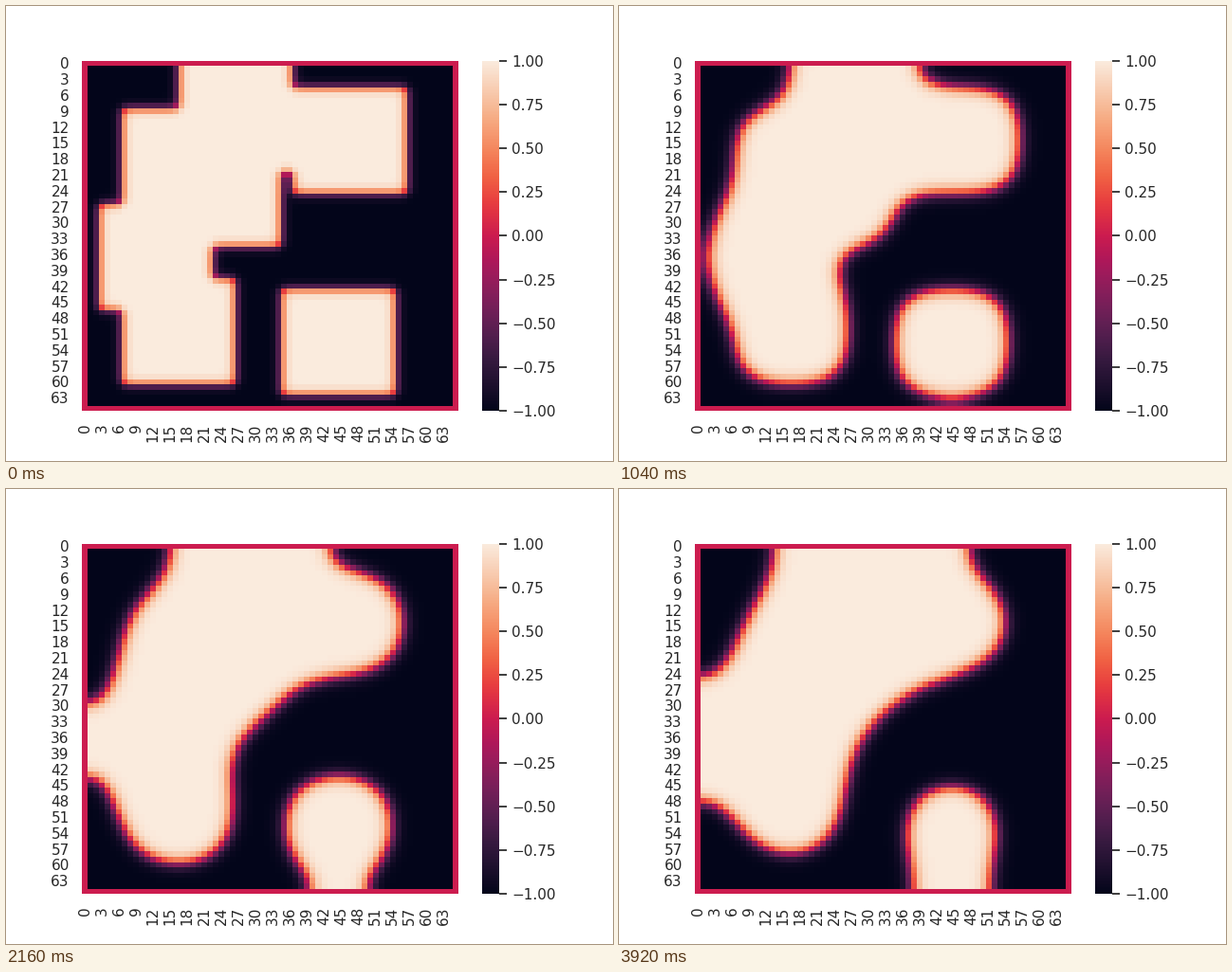
A matplotlib script that plays this animation: 640x480 px, repeating every 4 s.

```python
import matplotlib.pyplot as plt
import numpy as np
from matplotlib.animation import FuncAnimation
from matplotlib.colors import LinearSegmentedColormap

N = 64                  # inner cells per side
H = 1 / N
EPS = 4 * H / (2 * np.sqrt(2) * np.arctanh(0.9))
DT = 1e-5
SUBSTEPS = 10
FRAMES = 100
INTERVAL = 40
SIDE = 20
# Top-left cells (row, column) of the starting squares, rim included
SQUARES = [(1, 17), (5, 37), (9, 7), (15, 15), (27, 3), (41, 7), (43, 35)]

STOPS = [
    (0, "#03051a"), (1 / 7, "#35193e"), (1 / 5, "#4c1d4b"), (1 / 4, "#611f53"),
    (2 / 7, "#701f57"), (1 / 3, "#841e5a"), (2 / 5, "#a11a5b"),
    (3 / 7, "#ad1759"), (1 / 2, "#cb1b4f"), (4 / 7, "#e13342"),
    (3 / 5, "#e83f3f"), (2 / 3, "#f06043"), (5 / 7, "#f37651"),
    (3 / 4, "#f4875e"), (4 / 5, "#f69c73"), (5 / 6, "#f6aa82"),
    (6 / 7, "#f6b48f"), (1, "#faebdd"),
]
rocket = LinearSegmentedColormap.from_list("rocket_like", STOPS)


def start_field():
    u = -np.ones((N + 2, N + 2))
    for row, col in SQUARES:
        u[row:row + SIDE, col:col + SIDE] = 1
    return u[1:-1, 1:-1]


def step(u):
    """One explicit Allen-Cahn step with no-flux walls."""
    p = np.pad(u, 1, mode="edge")
    lap = p[2:, 1:-1] + p[:-2, 1:-1] + p[1:-1, 2:] + p[1:-1, :-2] - 4 * u
    return u + DT * (lap / H**2 + (u - u**3) / EPS**2)


def evolve(count):
    u = start_field()
    states = []
    for _ in range(count):
        for _ in range(SUBSTEPS):
            u = step(u)
        states.append(np.pad(u, 1))    # the rim stays at zero
    return states


states = evolve(FRAMES)

plt.rcParams.update({
    "font.family": "DejaVu Sans",
    "xtick.labelsize": 11, "ytick.labelsize": 11,
    "xtick.color": ".15", "ytick.color": ".15",
    "xtick.major.size": 6, "ytick.major.size": 6,
    "xtick.major.width": 1.25, "ytick.major.width": 1.25,
})

fig, ax = plt.subplots(figsize=(6.4, 4.8), dpi=100, facecolor="white")
mesh = ax.pcolormesh(states[0], cmap=rocket, vmin=-1, vmax=1)
ax.set(xlim=(0, N + 2), ylim=(N + 2, 0))
ticks = np.arange(0, N + 2, 3)
ax.set_xticks(ticks + 0.5, [str(t) for t in ticks], rotation=90)
ax.set_yticks(ticks + 0.5, [str(t) for t in ticks])
ax.tick_params(left=False, bottom=False)
ax.spines[:].set_visible(False)

bar = fig.colorbar(mesh, ax=ax, ticks=np.linspace(-1, 1, 9))
bar.outline.set_linewidth(0)


def update(k):
    # Near the end each picture is held for two ticks
    i = k if k < 88 else k - k % 2
    mesh.set_array(states[i])
    return [mesh]


anim = FuncAnimation(fig, update, frames=FRAMES, interval=INTERVAL, repeat=True)
plt.show()
```
